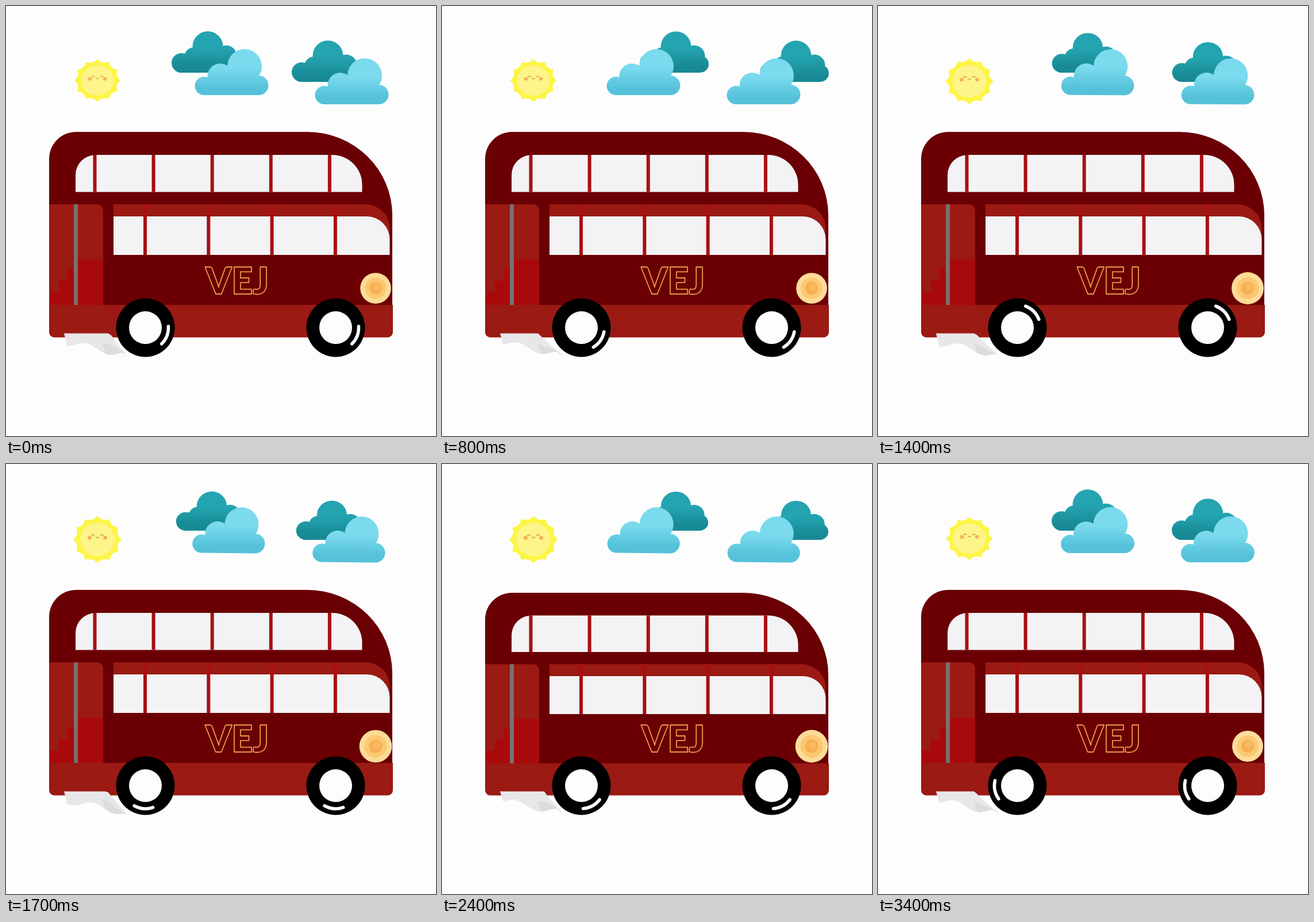
Recreate the animation shown at these times as an HTML page with a canvas. Size 748x748 px, loop 3500 ms.

```html
<!DOCTYPE html>
<html lang="en">
<head>
<meta charset="utf-8">
<title>Red bus</title>
<style>
html, body { margin: 0; width: 100%; height: 100%; overflow: hidden; background: #fefdfe; }
canvas { display: block; width: 748px; height: 748px; }
</style>
</head>
<body>
<canvas id="stage" width="748" height="748"></canvas>
<script>
const ctx = document.getElementById('stage').getContext('2d');
const LOOP = 3500, STEP = 100, TAU = Math.PI * 2;
const PAPER = '#fefdfe', MAROON = '#6a0003', RED = '#9b1a13', BRIGHT = '#a80a0c', GLASS = '#f3f2f4';

// Triangle wave, 0 to 1 and back
const pingPong = (t, period) => 1 - Math.abs(1 - t % period / (period / 2));
// One slow swell in the middle of the loop
const swell = t => Math.exp(-(((t - 2150) / 1000) ** 4));

function disc(x, y, r, fill) {
  ctx.fillStyle = fill;
  ctx.beginPath();
  ctx.arc(x, y, r, 0, TAU);
  ctx.fill();
}

function rect(x, y, w, h, fill, radii = 0) {
  ctx.fillStyle = fill;
  ctx.beginPath();
  ctx.roundRect(x, y, w, h, radii);
  ctx.fill();
}

function arc(x, y, r, from, to) {
  ctx.beginPath();
  ctx.arc(x, y, r, from, to);
  ctx.stroke();
}

// Runs paint with the plane scaled and turned about a fixed point
function pinned(x, y, sx, sy, turn, paint) {
  ctx.save();
  ctx.translate(x, y);
  ctx.rotate(turn);
  ctx.scale(sx, sy);
  paint();
  ctx.restore();
}

// A cloud stands on y = 0 and is centred on x = 0
function cloud(height, top, bottom, lobes) {
  const g = ctx.createLinearGradient(0, -height, 0, 0);
  g.addColorStop(0, top);
  g.addColorStop(.4, top);
  g.addColorStop(.85, bottom);
  ctx.fillStyle = g;
  ctx.beginPath();
  for (const [x, y, r] of lobes) {
    ctx.moveTo(x + r, y);
    ctx.arc(x, y, r, 0, TAU);
  }
  ctx.rect(-46, -30, 93, 30);
  ctx.fill();
}

function cloudPair(x, y, t) {
  const sway = 2 + 56 * pingPong(t, 1600), low = swell(t);
  pinned(x + 345 + sway, y + 116, 1 - low * .015, 1 - low * .055, 0, () =>
    cloud(72, '#24a4b0', '#178a95', [[-42, -17, 17], [-20, -27, 17], [4, -45.5, 26.5], [36, -29, 18.5], [46, -15, 15]]));
  pinned(x + 394 - sway * .75, y + 155, 1 - low * .015, 1, low * .01, () =>
    cloud(80, '#7bdaee', '#55c2d9', [[-48, -16, 16], [-20, -33, 22], [22.5, -50, 30], [47, -17, 17]]));
}

function star(r, n) {
  ctx.beginPath();
  for (let i = 0; i <= n; i++) {
    const a = i / n * TAU, m = a - Math.PI / n;
    ctx.quadraticCurveTo(Math.cos(m) * r * .77, Math.sin(m) * r * .77, Math.cos(a) * r, Math.sin(a) * r);
  }
  ctx.fill();
}

function sun(t) {
  const s = swell(t);
  pinned(159, 129.5 + 2 * s, 1 + .05 * s, .92 + .1 * s, 0, () => {
    ctx.fillStyle = '#fdf545';
    star(40.5, 12);
    disc(0, 0, 28.5, '#fdf48a');
    ctx.strokeStyle = '#b77a35';
    ctx.lineWidth = 1;
    for (const side of [-1, 1]) {
      disc(side * 13, -3, 3.3, '#f2b157');
      arc(side * 7.5, -6.5, 2.1, Math.PI, TAU);
    }
    arc(0, -5, 2.2, .2, 2.94);
  });
}

function posts(x, gap, n, y, h) {
  for (let i = 0; i < n; i++) rect(x + i * gap - 3, y, 6, h, '#a90f12');
}

function shell() {
  ctx.fillStyle = MAROON;
  ctx.beginPath();
  ctx.moveTo(75, 540);
  ctx.arc(122, 266, 47, Math.PI, Math.PI * 1.5);
  ctx.ellipse(524, 364, 148, 145, 0, -Math.PI / 2, 0);
  ctx.lineTo(672, 540);
  ctx.fill();
}

function body(t) {
  const phase = t / 210 % 2;
  const down = phase > .75 && phase < 1.7;
  pinned(0, 576, 1, down ? .986 : 1, 0, () => {
    ctx.translate(0, -576);
    shell();

    rect(121, 259, 498.5, 64.5, GLASS, [35, 52, 0, 0]);
    posts(154.5, 102.1, 5, 259, 64.5);

    rect(187, 345, 480.5, 60, RED, [0, 42, 0, 0]);
    rect(187, 366, 480.5, 67, GLASS, [0, 40, 0, 0]);
    posts(242, 110.3, 4, 345, 88);

    rect(75, 345, 94, 177, RED, [0, 11, 0, 0]);
    rect(125, 441, 43.5, 80, BRIGHT);
    for (let i = 0; i < 3; i++) rect(107 - i * 15, 458 + i * 20, 15, 63 - i * 20, BRIGHT);
    rect(118, 345, 7, 176, '#7a7070');

    rect(75, 520, 598, 56.5, RED, [0, 0, 9, 9]);
  });
}

// A ragged trail whose lower edge ripples with time
function smoke(t) {
  const wave = t / 210, bend = .66 + .07 * Math.cos(t / 330);
  const top = u => 569.5 + 39 * Math.max(0, (u - bend) / (1 - bend)) ** .9;
  const low = u => Math.max(top(u) + 2, 585 + 22 * u + 6 * Math.cos(9 * u - Math.sin(wave)));
  const trail = (from, upper, fill) => {
    ctx.fillStyle = fill;
    ctx.beginPath();
    for (let u = from; u <= 1; u += .05) ctx.lineTo(101 + 110 * u, upper(u));
    for (let u = 1; u >= from; u -= .05) ctx.lineTo(101 + 110 * u, low(u));
    ctx.fill();
  };
  trail(0, top, '#e7e6e8');
  trail(.6, u => (top(u) + low(u)) / 2, '#dcdbde');
}

function lamp(t) {
  const r = 26.8 + 1.6 * swell(t);
  disc(643, 491, r, '#fddb99');
  disc(643, 491, r * .7, '#fbc972');
  disc(643, 491, r * .41, '#f7b052');
  disc(645, 489, r * .22, '#f9ba62');
}

function wheel(x, t) {
  const y = 559.5, mid = (21 + t * .467) * Math.PI / 180;
  disc(x, y, 51, '#000');
  disc(x, y, 28.5, PAPER);
  ctx.strokeStyle = PAPER;
  ctx.lineWidth = 5.5;
  ctx.lineCap = 'round';
  arc(x, y, 40, mid - .42, mid + .42);
}

function label() {
  ctx.font = '900 64px Lato, sans-serif';
  ctx.textAlign = 'center';
  ctx.lineJoin = 'round';
  ctx.lineWidth = 1.8;
  ctx.strokeStyle = '#ed994c';
  ctx.strokeText('VEJ', 402, 501);
}

function draw(t) {
  ctx.fillStyle = PAPER;
  ctx.fillRect(0, 0, 748, 748);
  sun(t);
  cloudPair(0, 0, t);
  cloudPair(209, 16, t);
  body(t);
  label();
  lamp(t);
  smoke(t);
  wheel(242.5, t);
  wheel(573.5, t);
}

const start = performance.now();
function tick() {
  const t = (performance.now() - start) % LOOP;
  draw(Math.floor(t / STEP) * STEP);
  requestAnimationFrame(tick);
}
tick();
</script>
</body>
</html>
```
